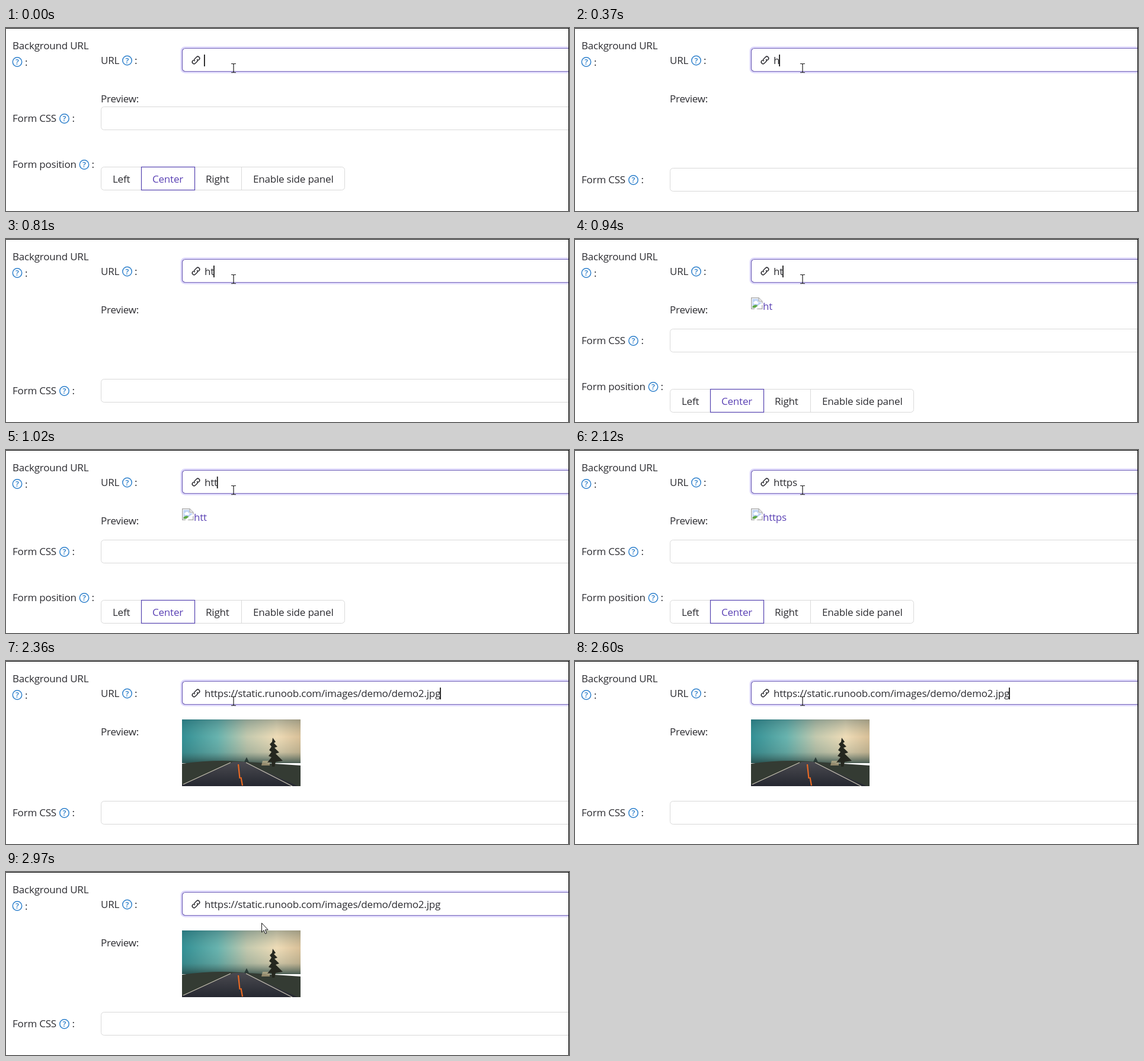
Recreate the animation shown at these times as an HTML page. Size 950 by 310 pixels, loop 3010 ms.

```html
<!DOCTYPE html>
<html lang="en">
<head>
<meta charset="utf-8">
<title>Background URL form</title>
<style>
  html, body { margin: 0; width: 100%; height: 100%; overflow: hidden; background: #fff; }
  svg { display: block; }
  text { font: 17px "Open Sans", "Noto Sans", sans-serif; letter-spacing: -.2px; fill: #2b2b30; white-space: pre; }
  .accent { fill: #5a41b4; }
  .box { fill: #fff; stroke: #d9d9d9; }
  .help circle { fill: none; stroke: #2e80cc; stroke-width: 1.5; }
  .help text { font-size: 13px; font-weight: 600; letter-spacing: 0; fill: #2e80cc; text-anchor: middle; }
</style>
</head>
<body>
<svg width="950" height="310" viewBox="0 0 950 310">
  <defs>
    <g id="help" class="help"><circle r="7.7"/><text y="4.7">?</text></g>
    <linearGradient id="sky">
      <stop offset="0" stop-color="#328f94"/>
      <stop offset=".3" stop-color="#68b3ae"/>
      <stop offset=".55" stop-color="#c3c9ae"/>
      <stop offset=".8" stop-color="#efdcb7"/>
      <stop offset="1" stop-color="#d8bf97"/>
    </linearGradient>
    <linearGradient id="haze" x2="0" y2="1">
      <stop offset="0" stop-color="#123c48" stop-opacity=".3"/>
      <stop offset=".4" stop-color="#4f7b78" stop-opacity="0"/>
      <stop offset=".75" stop-color="#3f605c" stop-opacity=".2"/>
      <stop offset="1" stop-color="#24413f" stop-opacity=".8"/>
    </linearGradient>
    <linearGradient id="road" x2="0" y2="1">
      <stop offset="0" stop-color="#4a4a50"/>
      <stop offset="1" stop-color="#1d2029"/>
    </linearGradient>
    <clipPath id="frame"><path d="M0 0H200V113H0Z"/></clipPath>
  </defs>

  <text x="11" y="36">Background URL</text>
  <use href="#help" x="19" y="57.5"/><text x="32" y="64">:</text>
  <text x="160" y="61">URL</text>
  <use href="#help" x="204.5" y="55"/><text x="217" y="61">:</text>
  <text x="160" y="126">Preview:</text>

  <rect x="295.8" y="32.8" width="700" height="42.4" rx="6" fill="none" stroke="#dcd6fb" stroke-width="2.6"/>
  <rect x="297.5" y="34.5" width="700" height="39" rx="5" fill="#fff" stroke="#7566b8" stroke-width="1.2"/>
  <path transform="translate(320.5 54.5) rotate(-45)" fill="none" stroke="#2b2b30" stroke-width="1.5"
    d="M-2.5-3H-4.5a3 3 0 0 0 0 6H-.5a3 3 0 0 0 3-3M2.5 3H4.5a3 3 0 0 0 0-6H.5a3 3 0 0 0-3 3"/>
  <text id="url" x="335" y="61"></text>
  <rect id="caret" y="45" width="1.7" height="20" fill="#111"/>

  <g id="broken">
    <g transform="translate(297 99)">
      <path d="M.7.7H13L18.8 6.5V19.3H.7Z" fill="#fff" stroke="#a5a5a5" stroke-width="1.3"/>
      <path d="M2.5 2.5H12V8H17V10L7 17.5H2.5Z" fill="#bfd3f5"/>
      <path d="M4 9a2 2 0 0 1 2-2 2.6 2.6 0 0 1 5 1 1.5 1.5 0 0 1 0 3H5.5A2 2 0 0 1 4 9Z" fill="#fff"/>
      <path d="M2.5 17.5V15Q7 10.5 11.5 14L7 17.5Z" fill="#5fa844"/>
      <path d="M13 .7V6.5H18.8" fill="#eee" stroke="#a5a5a5" stroke-width="1.2"/>
      <path d="M6.5 20.5L20 10.5" stroke="#fff" stroke-width="2.6"/>
    </g>
    <text id="alt" class="accent" x="317" y="120"></text>
  </g>

  <g id="photo" transform="translate(297 99)" clip-path="url(#frame)">
    <path d="M0 0H200V74H0Z" fill="url(#sky)"/>
    <path d="M0 0H200V74H0Z" fill="url(#haze)"/>
    <path d="M0 75Q50 68 95 71T200 78V113H0Z" fill="#343b33"/>
    <path d="M105 72L109 64L113 72Z" fill="#2a3b37"/>
    <path d="M136 70h12v8h-14Z" fill="#d5bf95" opacity=".6"/>
    <path d="M86 72H106L215 122H-25Z" fill="url(#road)"/>
    <path d="M82 73L2 110M108 73L186 113" stroke="#c9c4b4" stroke-width="1.2"/>
    <path d="M95 76L97.500 100M99.500 98L102 112" stroke="#ea6a24" stroke-width="2.200"/>
    <path d="M153 31L158 38 155 40 161 46 156 48 164 56 158 58 170 70 158 72 156 80H152L151 72 144 73 151 64 146 62 151 55 147 52 151 46 148 42 152 38Z" fill="#25271f"/>
  </g>

  <g id="lower">
    <text x="11" y="159">Form CSS</text>
    <use href="#help" x="98.500" y="153.500"/><text x="111.500" y="159">:</text>
    <rect class="box" x="160.500" y="133.500" width="840" height="39" rx="5"/>
    <text x="11" y="237">Form position</text>
    <use href="#help" x="132" y="231.500"/><text x="144.500" y="237">:</text>
    <rect class="box" x="160.500" y="235.500" width="411" height="39" rx="5"/>
    <path d="M397.500 236V274" stroke="#d9d9d9"/>
    <rect x="228.500" y="235.500" width="90" height="39" fill="#fff" stroke="#5543b0" stroke-width="1.200"/>
    <text x="180" y="262">Left</text>
    <text x="247" y="262" class="accent">Center</text>
    <text x="337" y="262">Right</text>
    <text x="417" y="262">Enable side panel</text>
  </g>

  <path id="beam" d="M380 60.500H383L384 61.500 385 60.500H388M384 61V75M380 75.500H383L384 74.500 385 75.500H388" fill="none" stroke="#222" stroke-width="1.200"/>
  <path id="arrow" transform="translate(431.500 86.500)" d="M0 0V15.500L3.500 12.200 6 18 8.300 17 5.900 11.400H10.700Z" fill="#fff" stroke="#111"/>
  <path d="M0 .5H950M949.500 0V310" stroke="#000"/>
</svg>
<script>
  const LOOP = 3010, BLINK = 530, POINTER_AT = 2930;
  const LINK = "https://static.runoob.com/images/demo/demo2.jpg";
  const EMPTY = 0, FAILED = 19, LOADING = 104; // offset of the lower rows

  // [time of key press, text, time the image load fails]
  const keys = [
    [0, "", 0],
    [370, "h", 410],
    [810, "ht", 850],
    [1020, "htt", 1020],
    [1260, "http", 1260],
    [1510, "https", 1510],
    [2360, LINK, Infinity]
  ];

  const el = id => document.getElementById(id);
  const show = (id, on) => el(id).style.display = on ? "" : "none";

  function draw(now) {
    const t = now % LOOP;
    const [since, text, failAt] = keys.findLast(k => k[0] <= t);
    const offset = !text ? EMPTY : t >= failAt ? FAILED : LOADING;

    el("url").textContent = el("alt").textContent = text;
    el("caret").setAttribute("x", 334 + (text ? el("url").getComputedTextLength() : 0));
    el("lower").setAttribute("transform", `translate(0 ${offset})`);
    show("caret", t - since < BLINK);
    show("broken", offset === FAILED);
    show("photo", text === LINK);
    show("beam", t < POINTER_AT);
    show("arrow", t >= POINTER_AT);
  }

  const start = performance.now();
  function tick() {
    draw(performance.now() - start);
    requestAnimationFrame(tick);
  }
  tick();
</script>
</body>
</html>
```
